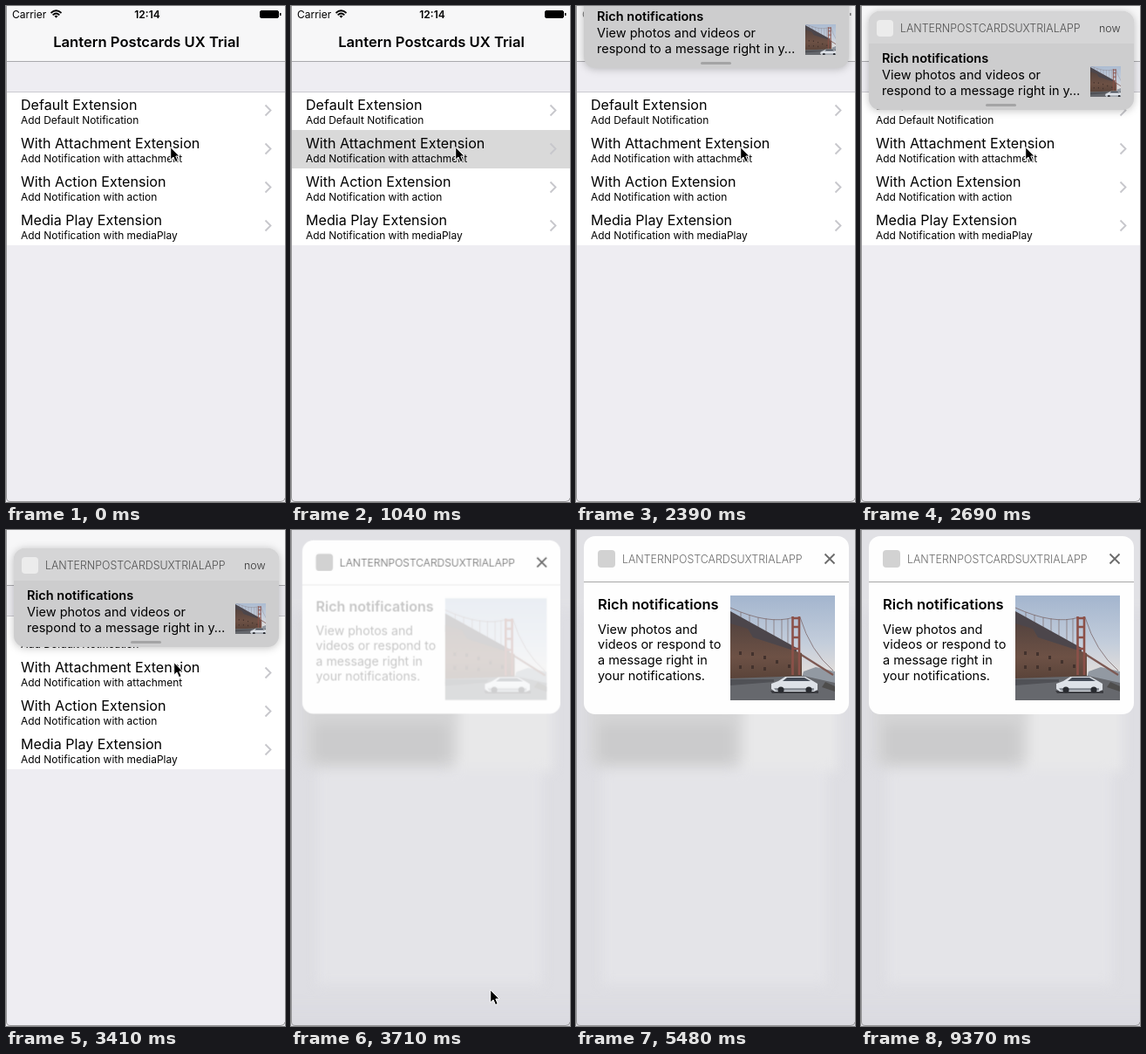
Recreate the animation shown at these times as an HTML page. Size 320 by 568 pixels, loop 9.39 s.

```html
<!DOCTYPE html>
<html lang="en">
<head>
<meta charset="utf-8">
<title>Rich notification</title>
<style>
html, body { margin: 0; width: 100%; height: 100%; overflow: hidden; background: #efeff4; }
svg.stage { display: block; width: 320px; height: 568px; font-family: Inter, Roboto, sans-serif; }
text { white-space: pre; }
.bold { font-weight: 600; }
.status { font-size: 12px; }
.nav { font-size: 16.6px; text-anchor: middle; }
.title { font-size: 16.1px; }
.sub { font-size: 11.96px; }
.app { font-size: 12.4px; font-weight: 300; }
.body { font-size: 14.5px; }

#press, #status, #banner, #blur, #card, #content, #cursor {
  animation: 9390ms step-end infinite;
}
#press { animation-name: press; }
#status { animation-name: status; }
#banner { animation-name: banner; }
#blur { animation-name: blur; }
#card { animation-name: card; transform-origin: 161px 109px; }
#content { animation-name: content; }
#cursor { animation-name: cursor; }

#shade { filter: drop-shadow(0 1px 5px rgba(0, 0, 0, .24)); }
.soft { filter: blur(7px); }

@keyframes press {
  0% { opacity: 0; }
  11.07% { opacity: 1; }
  14.27%, 100% { opacity: 0; }
}
@keyframes status {
  0% { opacity: 1; }
  25.45% { opacity: .5; }
  27.05%, 100% { opacity: 0; }
}
@keyframes banner {
  0% { transform: translateY(-140px); opacity: 1; }
  23.85% { transform: translateY(-101px); }
  25.45% { transform: translateY(-50px); }
  27.05% { transform: translateY(-14px); }
  28.64% { transform: translateY(-2px); }
  30.13% { transform: none; }
  34.82% { transform: translateY(2px); }
  36.31% { transform: translateY(13px); opacity: 1; }
  37.91% { transform: translateY(20px); opacity: .5; }
  39.5%, 100% { transform: translateY(20px); opacity: 0; }
}
@keyframes blur {
  0% { opacity: 0; }
  37.91% { opacity: .65; }
  39.5%, 100% { opacity: 1; }
}
@keyframes card {
  0% { transform: translateY(6px) scale(.95); opacity: 0; }
  37.91% { transform: translateY(6px) scale(.95); opacity: .65; }
  39.5% { transform: translateY(2px) scale(.974); opacity: 1; }
  41.1% { transform: translateY(1px) scale(.99); opacity: 1; }
  42.59%, 100% { transform: none; opacity: 1; }
}
@keyframes content {
  0% { opacity: 0; }
  39.5% { opacity: .22; }
  41.1% { opacity: .7; }
  42.59%, 100% { opacity: 1; }
}
@keyframes cursor {
  0% { transform: translate(188px, 161px); }
  30.13% { transform: translate(190px, 140px); }
  31.73% { transform: translate(191px, 118px); }
  33.33% { transform: translate(191px, 116px); }
  34.82% { transform: translate(191px, 122px); }
  36.31% { transform: translate(192px, 151px); }
  37.91% { transform: translate(206px, 330px); }
  39.5% { transform: translate(228px, 526px); }
  41.1% { transform: translate(223px, 520px); }
  42.59% { transform: translate(220px, 516px); }
  55.16% { transform: translate(238px, 535px); }
  56.76% { transform: translate(261px, 558px); }
  58.36%, 100% { transform: translate(330px, 590px); }
}
</style>
</head>
<body>
<svg class="stage" viewBox="0 0 320 568">
  <defs>
    <linearGradient id="sky" x2="0" y2="1">
      <stop stop-color="#a3b5ce"/>
      <stop offset=".45" stop-color="#c3cddb"/>
      <stop offset=".75" stop-color="#e2dedb"/>
    </linearGradient>
    <linearGradient id="fort" x2="0" y2="1">
      <stop stop-color="#55443f"/>
      <stop offset=".6" stop-color="#6d5145"/>
      <stop offset="1" stop-color="#594339"/>
    </linearGradient>
    <path id="chevron" d="M297.5 15.5 l6 6 -6 6" fill="none" stroke="#c7c7cc" stroke-width="1.9"/>
    <symbol id="photo" viewBox="0 0 120 120">
      <rect width="120" height="120" fill="url(#sky)"/>
      <path d="M84 87 l14 -5 22 5 v15 h-40z" fill="#9299a2"/>
      <g fill="none" stroke="#7d6a6c">
        <path d="M0 14 Q44 34 73 25 M80 25 Q92 64 118 86" stroke-width=".8"/>
        <path d="M12 19 v12 M22 22 v14 M32 25 v16 M41 26 v20 M50 27 v22 M59 27 v27 M66 26 v31" stroke-width=".7"/>
        <path d="M80 67 L118 91" stroke="#7d5953" stroke-width="2.2"/>
      </g>
      <path d="M0 18 L76 60 V69 L0 40z" fill="#4c464b"/>
      <path d="M0 32 L20 38 26 48 82 66 V96 H0z" fill="url(#fort)"/>
      <path d="M10 66 h3 M24 67 h3 M38 71 h3 M52 76 h3 M66 81 h3 M10 82 h3 M24 82 h3 M38 84 h3" stroke="#43322d" stroke-width="4"/>
      <path d="M71.5 91 V24 M79 91 V24 M71 26 h9 M71 36 h9 M71 48 h9 M71 61 h9" fill="none" stroke="#8c5149" stroke-width="2.6"/>
      <path d="M0 95 L84 92 120 100 V120 H0z" fill="#66686d"/>
      <path d="M0 96 H50 V99 L0 103z" fill="#505156"/>
      <path d="M105 105 l4 -6 11 5 v6z" fill="#4e4d4c"/>
      <path d="M46 109 h55 v3 h-53z" fill="#3b3c41"/>
      <path d="M47 107 v-6 l8 -3 8 -5 h23 l9 5 5 3 v7 l-4 2 H51z" fill="#dde1e7"/>
      <path d="M50 106 h46 v3 h-44z" fill="#8d929a"/>
      <path d="M60 98 l5 -4 h20 l7 4z" fill="#464d58"/>
      <circle cx="58" cy="108" r="3.6" fill="#292b30"/>
      <circle cx="90" cy="108" r="3.6" fill="#292b30"/>
    </symbol>
  </defs>

  <rect width="320" height="568" fill="#eeedf2"/>
  <rect width="320" height="63" fill="#f7f7f8"/>
  <rect y="63" width="320" height="1" fill="#a9a9ad"/>
  <rect y="98" width="320" height="176" fill="#fff"/>
  <rect y="98" width="320" height="1" fill="#cbcad0"/>
  <rect id="press" y="142" width="320" height="44" fill="#d9d9d9"/>

  <g id="status" class="status">
    <text x="7" y="13.5">Carrier</text>
    <g fill="none" stroke="#000" stroke-width="1.7">
      <path d="M51.5 8 Q57.5 2.5 63.5 8 M53.6 10.3 Q57.5 6.7 61.4 10.3"/>
      <path d="M57.5 13.8 l-2 -2.2 q2 -1.6 4 0z" fill="#000" stroke="none"/>
    </g>
    <text x="162" y="13.5" class="bold" text-anchor="middle">12:14</text>
    <rect x="291.5" y="5.5" width="21" height="8" rx="1.5" stroke="#000"/>
    <rect x="314" y="8" width="1.5" height="3"/>
  </g>
  <text class="nav bold" x="161" y="47">Lantern Postcards UX Trial</text>

  <g transform="translate(0 98)">
    <text class="title" x="17" y="21">Default Extension</text>
    <text class="sub" x="17" y="37">Add Default Notification</text>
    <use href="#chevron"/>
  </g>
  <g transform="translate(0 142)">
    <text class="title" x="17" y="21">With Attachment Extension</text>
    <text class="sub" x="17" y="37">Add Notification with attachment</text>
    <use href="#chevron"/>
  </g>
  <g transform="translate(0 186)">
    <text class="title" x="17" y="21">With Action Extension</text>
    <text class="sub" x="17" y="37">Add Notification with action</text>
    <use href="#chevron"/>
  </g>
  <g transform="translate(0 230)">
    <text class="title" x="17" y="21">Media Play Extension</text>
    <text class="sub" x="17" y="37">Add Notification with mediaPlay</text>
    <use href="#chevron"/>
  </g>

  <g id="banner">
    <rect id="shade" x="9" y="8" width="304" height="113" rx="13" fill="#cdcdce"/>
    <path d="M9 45 V21 a13 13 0 0 1 13 -13 H300 a13 13 0 0 1 13 13 V45z" fill="#d5d5d6"/>
    <rect x="18" y="18" width="19" height="19" rx="4" fill="#ececec"/>
    <text class="app" x="45" y="32" fill="#505050">LANTERNPOSTCARDSUXTRIALAPP</text>
    <text class="app" x="273" y="32" fill="#333">now</text>
    <text class="bold" x="24" y="67" font-size="14.55">Rich notifications</text>
    <text class="body" x="24" y="86">View photos and videos or</text>
    <text class="body" x="24" y="104">respond to a message right in y…</text>
    <svg x="263" y="71" width="35" height="35" viewBox="0 15 95 95"><use href="#photo" width="120" height="120"/></svg>
    <rect x="143" y="114" width="35" height="3" rx="1.5" fill="#a4a4a5"/>
  </g>

  <g id="blur">
    <rect width="320" height="568" fill="#dedee3"/>
    <g class="soft">
      <rect x="-20" y="-20" width="360" height="110" fill="#e1e1e5"/>
      <rect x="188" y="100" width="112" height="176" fill="#e8e8e9"/>
      <rect x="30" y="274" width="258" height="246" fill="#e4e4e8"/>
      <rect x="14" y="95" width="178" height="178" rx="14" fill="#d5d5d6"/>
      <rect x="26" y="222" width="154" height="44" rx="8" fill="#cbcbcc"/>
      <rect x="-20" y="545" width="360" height="40" fill="#dbdbe1"/>
    </g>
  </g>

  <g id="card">
    <rect x="9" y="7" width="304" height="204" rx="13" fill="#fefefe"/>
    <rect x="25" y="23" width="20" height="20" rx="4" fill="#d2d2d2"/>
    <text class="app" x="53" y="38" fill="#6a6a6a">LANTERNPOSTCARDSUXTRIALAPP</text>
    <path d="M285.5 27.5 l11 11 m0 -11 l-11 11" stroke="#6a6a6a" stroke-width="1.8"/>
    <g id="content">
      <rect x="9" y="59" width="304" height="1" fill="#a6a6a6"/>
      <text class="bold" x="25" y="91" font-size="16.5">Rich notifications</text>
      <text class="body" x="25" y="118.5">View photos and</text>
      <text class="body" x="25" y="136.3">videos or respond to</text>
      <text class="body" x="25" y="154.1">a message right in</text>
      <text class="body" x="25" y="171.9">your notifications.</text>
      <use href="#photo" x="177" y="75" width="120" height="120"/>
    </g>
  </g>

  <path d="M.5 0 V563 q0 4.5 4.5 4.5 H315 q4.5 0 5 -4" fill="none" stroke="#969698"/>
  <path id="cursor" d="M.7 .5 V15 L4 12 6.5 17.7 9.2 16.5 6.8 11 H11z" stroke="#fff" stroke-width="1"/>
</svg>
</body>
</html>
```
